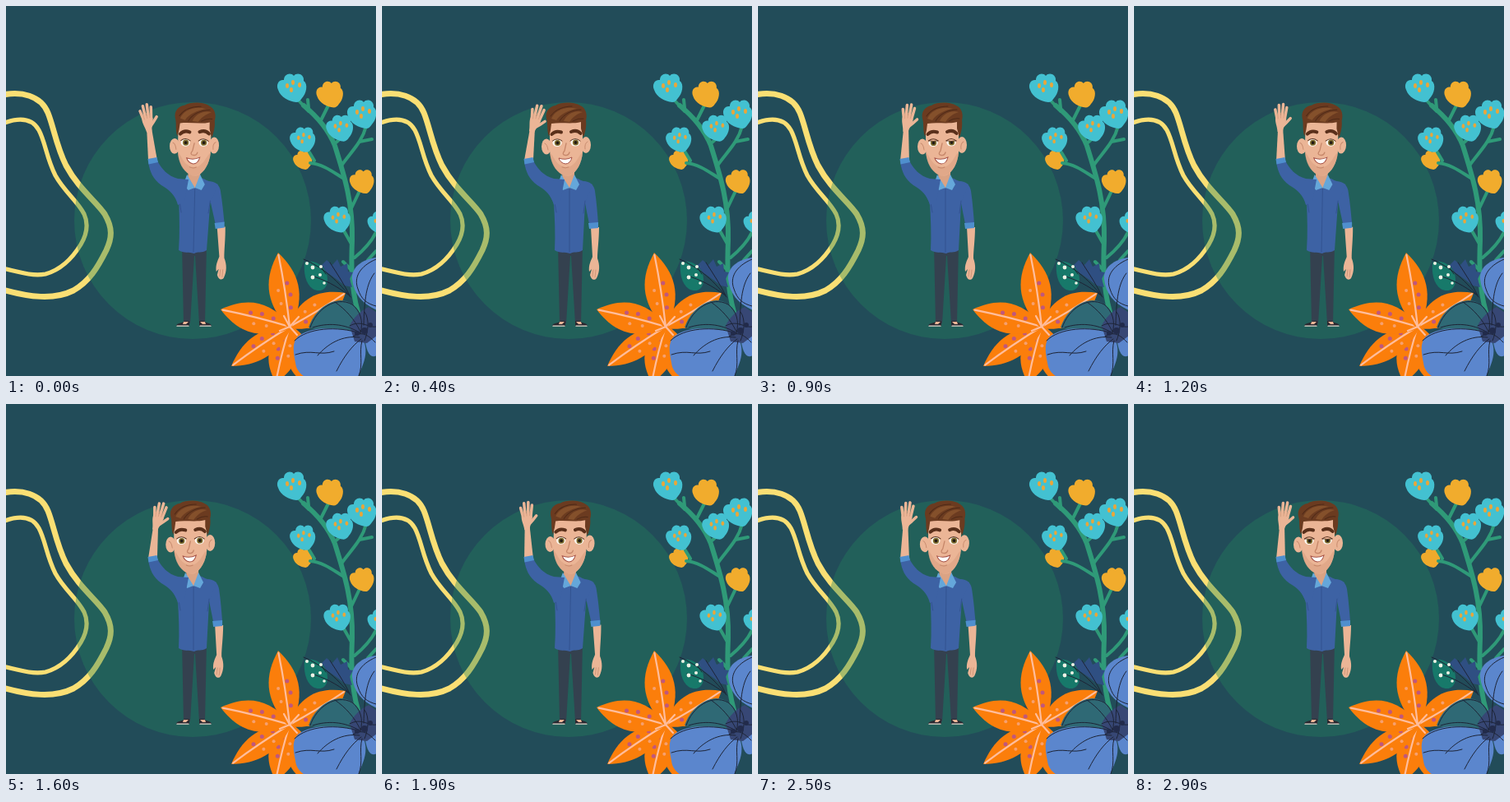
Recreate the animation shown at these times as an HTML page. Size 450 by 450 pixels, loop 3000 ms.

```html
<!DOCTYPE html>
<html lang="en">
<head>
<meta charset="utf-8">
<title>Waving man</title>
<style>
  html, body { margin: 0; width: 100%; height: 100%; overflow: hidden; background: #224c59; }
  svg { display: block; width: 100vw; height: 100vh; }
  .line { fill: none; stroke-linecap: round; stroke-linejoin: round; }
  .stem { stroke: #2f9a78; stroke-width: 4; }
  .ink { stroke: #1d2436; stroke-width: 1; }
  .vein { stroke: #ffbd9c; stroke-width: 2.2; }
  .skin { fill: #ebb596; }
  .shirt { fill: #3d62a4; }
  .cuff { fill: #4f8fce; }
</style>
</head>
<body>
<svg viewBox="0 0 450 450">
  <defs>
    <path id="bud" d="M5 18C-4 17-14 12-17 3C-20-4-16-10-10-9C-10-16-2-19 2-14C6-19 15-16 14-8C20-4 17 8 12 13C10 16 8 18 5 18Z"/>
    <g id="blueBud">
      <use href="#bud" fill="#43c1d1"/>
      <g fill="#e9a63a">
        <ellipse cx="-6" cy="-2" rx="2" ry="3"/><ellipse cx="1" cy="-6" rx="2" ry="3"/>
        <ellipse cx="9" cy="-3" rx="2" ry="3"/><ellipse cx="-1" cy="3" rx="2" ry="3"/>
      </g>
    </g>
    <g id="eye">
      <ellipse rx="5.6" ry="4.6" fill="#fbf7f0"/>
      <circle cx=".5" r="3.6" fill="#7b6a2c"/>
      <circle cx=".5" r="1.9" fill="#221a14"/>
    </g>
  </defs>

  <rect width="450" height="450" fill="#224c59"/>

  <g class="line" stroke="#fadf74">
    <path stroke-width="7" d="M-4 108C18 104 42 108 51 130C58 147 61 170 73 194C88 222 110 238 120 253C130 270 129 282 122 297C111 319 101 335 82 346C58 358 28 354-4 345"/>
    <path stroke-width="5.2" d="M-4 143C14 136 31 135 40 151C48 166 49 184 60 206C71 226 87 237 95 253C101 266 98 278 91 290C80 308 66 321 48 326C31 329 14 323-4 319"/>
  </g>
  <circle cx="227" cy="261" r="144" fill="#24815e" fill-opacity=".38"/>

  <!-- flowering branch -->
  <use href="#bud" transform="translate(361 187) scale(.66)" fill="#f0aa2c"/>
  <g class="line stem">
    <path stroke-width="6" d="M428 372C419 340 420 310 421 285C422 240 412 208 400 170C392 150 378 134 362 121"/>
    <path d="M356 115L368 128M367 114L368 124M383 139L392 121M399 168L406 162M408 194C419 178 433 166 438 146M430 165L445 162M411 210C398 202 385 192 370 191M369 178L375 188M420 246L430 225M421 291L409 270M424 306C436 296 445 286 450 275M440 309L450 298M421 322L410 311"/>
  </g>
  <use href="#blueBud" x="348" y="99"/>
  <use href="#blueBud" x="433" y="131"/>
  <use href="#blueBud" transform="translate(406 148) scale(.93)"/>
  <use href="#blueBud" transform="translate(361 162) scale(.88)"/>
  <use href="#blueBud" transform="translate(403 259) scale(.92)"/>
  <use href="#blueBud" transform="translate(454 263) scale(.8)"/>
  <g fill="#f1ac2d">
    <use href="#bud" transform="translate(394 107) scale(.92)"/>
    <use href="#bud" transform="translate(433 213) scale(.84)"/>
  </g>

  <!-- berries and leaves -->
  <path fill="#17796a" d="M363 312C377 307 391 318 391 333C391 345 382 349 373 344C364 337 362 325 363 312Z"/>
  <path fill="#2f4f82" d="M384 315L390 309L397 315L403 308L407 317L415 313L416 323L422 324L418 332L421 342L412 340L403 333L396 328L390 324Z"/>
  <path class="line ink" stroke-width="1.6" d="M362 308C383 317 400 330 419 354M371 328C388 333 401 340 416 351M394 312C403 326 411 338 418 352M389 326L382 316"/>
  <g fill="#edf2e5">
    <circle cx="366" cy="313" r="2"/><circle cx="373" cy="318" r="2.4"/><circle cx="383" cy="317" r="2"/>
    <circle cx="373" cy="330" r="2.4"/><circle cx="382" cy="327" r="2"/><circle cx="387" cy="337" r="1.8"/>
  </g>

  <g id="lily"></g>

  <!-- blue blossom -->
  <path fill="#2f6975" d="M368 391C374 373 389 359 407 358C423 359 432 370 433 386L426 399L397 398Z"/>
  <g fill="#5b86cd">
    <path d="M451 306C433 308 420 318 421 332C423 350 433 362 451 370Z"/>
    <path d="M430 398C407 390 371 389 355 402C347 410 350 424 352 434C353 444 360 449 365 452H428C432 439 442 425 435 407Z"/>
    <path d="M436 402L451 397V425C442 430 438 419 436 402Z"/>
  </g>
  <path fill="#374775" d="M418 389C422 379 431 371 441 366L451 373V401L439 410L424 408Z"/>
  <g class="line ink">
    <path d="M370 391C377 369 401 352 421 363C431 371 435 383 431 398M373 391C391 385 411 386 430 397M400 360C413 369 424 381 431 396"/>
    <path d="M431 398C403 389 367 391 351 407M430 403C409 400 391 411 379 425M432 405C421 413 411 426 402 444M433 407C429 422 435 435 429 450M352 424C372 417 381 426 399 420"/>
    <path d="M450 308C429 317 423 331 428 344C432 357 439 362 450 365M448 325C438 338 436 357 435 388M418 389C432 381 441 392 450 390M422 402C434 394 442 402 449 409M436 372C443 381 440 398 436 407"/>
  </g>
  <g fill="#222b4b"><circle cx="427" cy="398" r="3"/><circle cx="436" cy="395" r="4"/><circle cx="443" cy="388" r="3"/></g>

  <!-- man -->
  <path fill="#34414f" d="M214 290H244L242 386H235L230 304H229L224 386H216Z"/>
  <g fill="#2b2830">
    <path d="M207 389C208 385 215 386 217 383H223V389Z"/>
    <path d="M250 389C249 385 243 386 241 383H235V389Z"/>
  </g>
  <path class="line" stroke="#e8dcd0" stroke-width="1.2" d="M208 389.2H222M236 389.2H249"/>
  <path class="skin" d="M216 384H222L219 387H215ZM236 384H242L243 387H239Z"/>

  <g id="torso">
    <g id="armDown">
      <path class="skin" d="M254 269H264C264 284 262 297 262 307C265 315 265 323 261 331C258 335 254 332 253 327L255 320L252 323C251 315 254 310 256 305Z"/>
      <path class="line" stroke="#c98f72" stroke-width=".8" d="M257 321L256 329M260 321L259 330"/>
      <path class="shirt" d="M242 213C253 212 258 218 259 225C261 239 262 252 263 265H252L246 235Z"/>
      <path class="cuff" d="M251 264L263 263L263 270L252 271Z"/>
    </g>
    <path class="shirt" d="M215 211C224 207 234 207 242 212L256 217L247 240L244 297C238 301 233 298 229 301C223 299 216 301 210 297C211 277 210 258 209 240L199 221Z"/>
    <path fill="#dba384" d="M220 196H234V209L228 222L219 209Z"/>
    <path class="line" stroke="#31528e" stroke-width=".9" d="M228 222V299M247 237L245 252M210 239L212 251"/>
    <path fill="#65a7da" d="M218 205L228 221L220 224L214 217ZM234 205L228 221L236 224L240 217Z"/>
  </g>

  <g id="armUp">
    <path class="skin" d="M173 189L175 149H181L184 189Z"/>
    <g id="hand">
      <path class="skin" d="M174.5 153C174 146 171 141 172 136C174 132 183 132 185 137C185 143 181 148 181 153Z"/>
      <path class="line" stroke="#ebb596" stroke-width="3.5" d="M174 138L171.5 126M176.5 136L176 120.5M180 136L181.2 119.5M183 138L185.5 123.5M181 146L185 142L190 136.5"/>
      <path class="line" stroke="#cf987b" stroke-width=".7" d="M175 137L174.5 132M178.3 136V130M181.7 136L182.6 131"/>
    </g>
  </g>
  <path class="shirt" d="M173 190L184 188C189 198 197 207 209 210L222 211L217 238L209 242C206 230 199 224 189 218C178 210 175 201 173 190Z"/>
  <path class="cuff" d="M172.5 186L183.5 184L185 190L173.5 192.5Z"/>

  <g id="head">
    <g class="skin">
      <ellipse cx="200" cy="171" rx="6" ry="9.5"/>
      <ellipse cx="248" cy="169" rx="6" ry="10"/>
      <path d="M204 139H244V178C243 191 237 202 229 206C225 208 220 206 216 203C208 196 205 187 204 176Z"/>
    </g>
    <path fill="#d99f80" opacity=".55" d="M204 178C209 183 211 190 216 193C222 198 230 196 233 192C238 188 239 182 244 178C243 192 236 203 228 206C224 208 219 206 216 203C208 197 205 188 204 178Z"/>
    <path class="line" stroke="#c98d70" stroke-width="1" d="M198 167Q201 168 202 175M250 165Q246 167 247 174"/>
    <path fill="#6b3b20" d="M203 159C200 149 202 143 200 137C198 128 204 122 211 121C219 116 235 117 241 121C248 124 250 132 248 139C249 147 247 154 245 160L242 149V141C231 144 218 141 206 143L205 151Z"/>
    <path fill="#84502b" d="M206 137C210 127 224 121 237 125C228 126 216 132 212 139ZM221 140C224 132 234 126 244 129C237 131 231 136 228 141Z"/>
    <path class="line" stroke="#4f2a17" stroke-width="1" d="M205 134C211 125 222 122 231 122M216 140C221 131 232 126 242 126M232 140Q239 136 245 137"/>
    <use href="#eye" x="213" y="166.5"/>
    <use href="#eye" x="235" y="166"/>
    <g id="lids" class="skin">
      <path d="M206.5 160H219.5V167Q213 168.5 206.5 167Z"/>
      <path d="M228.5 160H241.5V167Q235 168.5 228.5 167Z"/>
      <path class="line" stroke="#4a2a1c" stroke-width="1.3" d="M207.5 167Q213 168.5 219 167M229 167Q235 168.5 241 167"/>
    </g>
    <path class="line" stroke="#5a3523" stroke-width="1" d="M207.5 164Q213 159.5 219 164M229 164Q235 159 241 164"/>
    <path class="line" stroke="#5a301b" stroke-width="4" d="M206.5 156Q211 151 218 153.5M230 153Q237 150 241.5 155"/>
    <path class="line" stroke="#c6876a" stroke-width="1.3" d="M224 167L222 176Q218 181 223 181.5Q227 182 228 178"/>
    <path fill="#fff" stroke="#a75449" stroke-width="1" d="M215 185Q223 188 231 184Q229 192 223 192Q217 191 215 185Z"/>
    <path class="line" stroke="#c6876a" stroke-width="1" d="M219 196Q223 198 227 196"/>
  </g>
</svg>
<script>
const $ = id => document.getElementById(id);
const LOOP = 3000, STEP = 100, CYCLE = 2000 / 3;

// Lily petals: tip x, tip y, half width
const heart = [345, 390];
const petals = [[372, 466, 24], [328, 458, 24], [274, 438, 21], [413, 349, 25], [261, 369, 26], [331, 300, 26]];

function petal([x, y, w]) {
  const [cx, cy] = heart, dx = x - cx, dy = y - cy, len = Math.hypot(dx, dy);
  const at = (along, side) =>
    `${(cx + dx * along - dy / len * side).toFixed(1)} ${(cy + dy * along + dx / len * side).toFixed(1)}`;
  const spots = [[.25, 5], [.32, -6], [.42, 7], [.5, -7], [.58, 5]].map(([a, s], i) =>
    `<circle cx="${at(a, s).replace(' ', '" cy="')}" r="${i % 2 ? 2 : 2.5}" fill="${i % 2 ? '#f6a06f' : '#c0577c'}"/>`);
  return `<path fill="#fb7e0b" d="M${at(0, 3)}C${at(.4, w)} ${at(.7, w * .8)} ${at(1, 0)}C${at(.7, -w * .8)} ${at(.4, -w)} ${at(0, -3)}Z"/>
    <path class="line vein" d="M${at(0, 0)}Q${at(.5, 2)} ${at(.97, 0)}"/>${spots.join('')}`;
}
$('lily').innerHTML = petals.map(petal).join('') +
  `<path class="line vein" d="M345 390L338 377M345 390L356 378M345 390L333 395M345 390L354 400"/>`;

// [time in cycle, hand swing, body lean]
const swing = [
  [0, -1, 1], [100, -.65, .7], [200, 0, .3], [233, .34, 0], [267, .8, .05],
  [333, 1.05, 0], [400, 1, 0], [467, .5, .35], [533, -.1, .8], [600, -.75, 1], [CYCLE, -1, 1]
];
// [time, lid closure]
const blink = [[0, 0], [800, 0], [900, .55], [1000, .8], [1100, 0], [2000, 0]];

function sample(table, t, col = 1) {
  const i = Math.max(1, table.findIndex(row => row[0] >= t));
  const a = table[i - 1], b = table[i];
  return a[col] + (b[col] - a[col]) * (t - a[0]) / (b[0] - a[0]);
}
const set = (id, value) => $(id).setAttribute('transform', value);

function draw(t) {
  const wave = sample(swing, t % CYCLE, 1);
  const lean = sample(swing, t % CYCLE, 2);
  const lid = sample(blink, t % 2000);
  set('armUp', `rotate(${.8 + 6.5 * wave} 178 188)`);
  set('hand', `rotate(${1 + 6.5 * wave} 178 152)`);
  set('torso', `translate(0 298) skewX(${-1.3 * lean}) translate(0 -298)`);
  set('armDown', `rotate(${-2.4 * lean} 254 220)`);
  set('head', `translate(${4.2 * lean} 0) rotate(${1.4 * lean} 226 204)`);
  set('lids', `translate(0 ${160 * (1 - lid)}) scale(1 ${lid})`);
  $('lids').style.display = lid > 0 ? '' : 'none';
}

const start = performance.now();
function tick() {
  const t = (performance.now() - start) % LOOP;
  draw(Math.floor(t / STEP) * STEP);
  requestAnimationFrame(tick);
}
tick();
</script>
</body>
</html>
```
